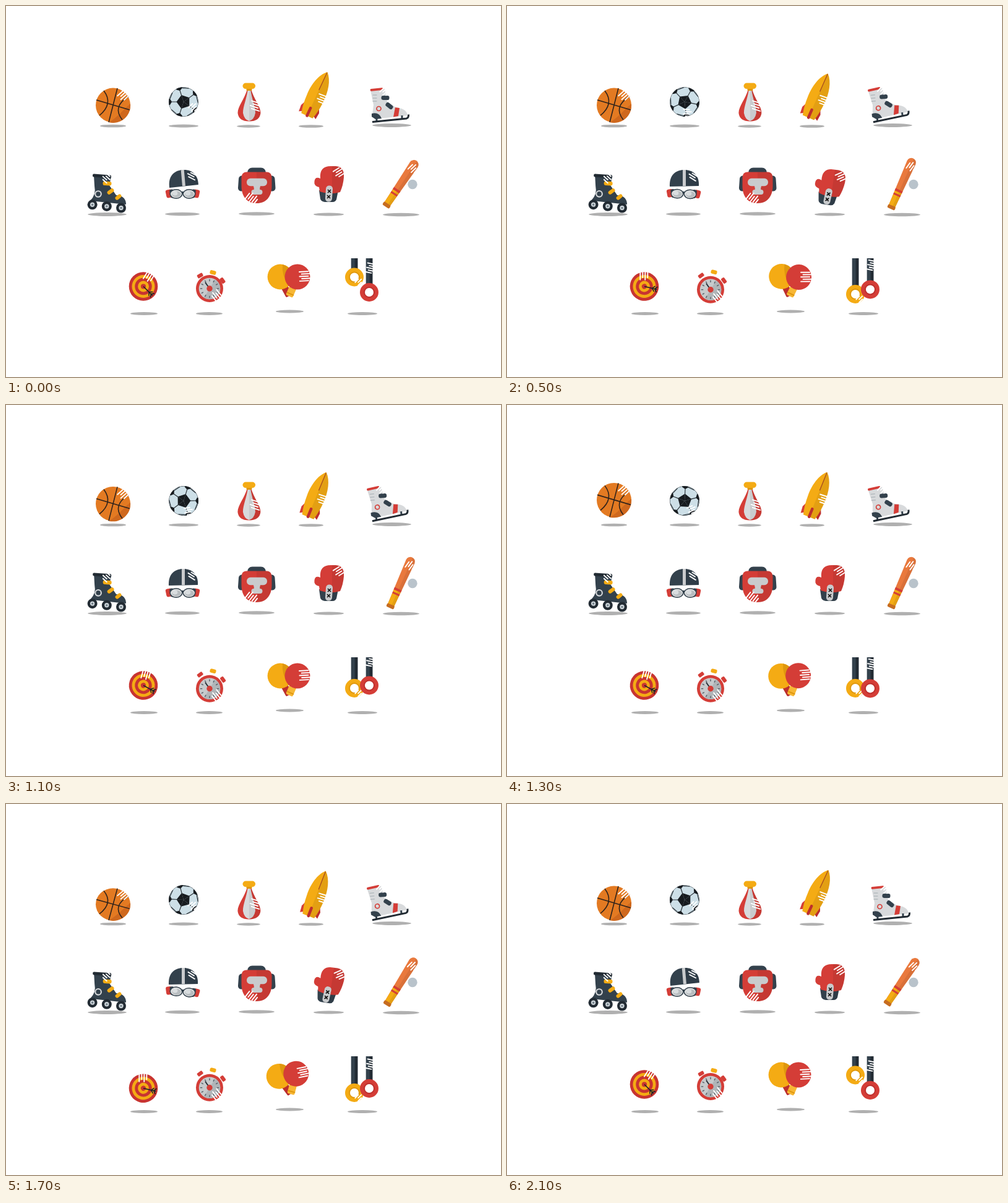
An HTML page with a canvas for the animation above (7100 ms loop, 800 px wide and 600 px high).

```html
<!DOCTYPE html>
<html lang="en">
<head>
<meta charset="utf-8">
<title>Sports icons</title>
<style>
html, body { margin: 0; width: 100%; height: 100%; overflow: hidden; background: #fff; }
canvas { display: block; width: 800px; height: 600px; }
</style>
</head>
<body>
<canvas id="stage" width="800" height="600"></canvas>
<script>
const ctx = document.getElementById('stage').getContext('2d');
const LOOP = 7100, ACTIVE = 2100, STEP = 100;
const RED = '#d43d37', DARK_RED = '#bd2f2d', YELLOW = '#f4ab14', AMBER = '#df970e';
const NAVY = '#33414c', INK = '#222b33', GREY = '#c9cbcd', PALE = '#d8dadc';

// Shapes; a shape with shadeX is darker to the right of it
function fill(color, d, shadeX) {
  const p = new Path2D(d);
  ctx.fillStyle = color;
  ctx.fill(p);
  if (shadeX === undefined) return;
  ctx.save();
  ctx.clip(p);
  ctx.fillStyle = 'rgba(0,0,0,.07)';
  ctx.fillRect(shadeX, -100, 800, 800);
  ctx.restore();
}
function line(color, width, d) {
  ctx.strokeStyle = color;
  ctx.lineWidth = width;
  ctx.stroke(new Path2D(d));
}
function oval(color, x, y, rx, ry = rx) {
  ctx.fillStyle = color;
  ctx.beginPath();
  ctx.ellipse(x, y, rx, ry, 0, 0, 7);
  ctx.fill();
}
function ring(color, x, y, r, width) {
  ctx.strokeStyle = color;
  ctx.lineWidth = width;
  ctx.beginPath();
  ctx.arc(x, y, r, 0, 7);
  ctx.stroke();
}
function bar(color, x, y, w, h, r = 0, deg = 0) {
  turn(x, y, deg, () => {
    ctx.fillStyle = color;
    ctx.beginPath();
    ctx.roundRect(-w / 2, -h / 2, w, h, r);
    ctx.fill();
  });
}
function shine(x, y, deg, n = 4, len = 13, gap = 4) {
  turn(x, y, deg, () => {
    for (let i = 0; i < n; i++) {
      bar('#fff', i % 2 ? 2 : -1.5, (i - (n - 1) / 2) * gap, len, 1.9, .9);
    }
  });
}
const shadow = (x, y, r) => oval('#b0b0b0', x, y, r, 1.2 + r * .055);

// Transforms
function turn(x, y, deg, draw, sy = 1) {
  ctx.save();
  ctx.translate(x, y);
  ctx.rotate(deg * Math.PI / 180);
  ctx.scale(1, sy);
  draw();
  ctx.restore();
}
const move = (dx, dy, draw) => turn(dx, dy, 0, draw);
// Rotate about a stage point while keeping stage coordinates
const pivot = (x, y, deg, draw, sy) => turn(x, y, deg, () => move(-x, -y, draw), sy);

// Motion
const sine = (t, period) => Math.sin(2 * Math.PI * t / period);
const wave = (t, period = 600) => (1 - Math.cos(2 * Math.PI * t / period)) / 2;
const beat = t => wave(t) ** 3;
const bounce = t => sine(t, 1000) ** 5;
const up = v => Math.max(0, v);
const bump = (t, mid, half) =>
  Math.abs(t - mid) < half ? Math.cos(Math.PI / 2 * (t - mid) / half) ** 2 : 0;

function basketball(t) {
  shadow(173, 194, 21);
  pivot(173, 188.5, 0, () => move(0, -8.5 * up(bounce(t)), () => {
    oval('#e37a22', 173, 160.5, 28);
    fill('#cf681d', 'M166 188C177 183 190 167 201 158A28 28 0 0 1 166 188Z');
    line('#30231b', 1.6, 'M146 152L200 168M180 133L166 188M158 137Q174 158 151 177M198 146Q171 163 188 184');
    shine(189.5, 145, -42);
  }), 1 - .085 * up(-bounce(t)));
}

function football(t) {
  shadow(287, 194, 24);
  const roll = 54 * Math.sin(Math.PI * (t / ACTIVE) ** .63) ** 3;
  turn(287, 155, roll, () => {
    ctx.beginPath();
    ctx.arc(0, 0, 24, 0, 7);
    ctx.clip();
    oval('#cddfe7', 0, 0, 24);
    for (let a = -36; a < 324; a += 72) turn(0, 0, a, () => {
      fill('#171b1f', 'M0 0L11.5 0L3.5 11ZM19 0L22 5L27 6V-6L22 -5Z');
      line('#2b3339', 1.2, 'M10 0H20M22 5L18 15');
    });
    ring('#2b3339', 0, 0, 23.8, .7);
    shine(16, 9, -45, 4, 11, 3.6);
  });
}

function punchBag(t) {
  shadow(392, 194.5, 19);
  pivot(393, 130, beat(t) * 8, () => {
    fill(RED, 'M390 134C386 150 374.5 162 374.5 173Q376 186.500 393 186.500T411.5 173C411.5 162 400 150 396 134Z', 393);
    fill(PALE, 'M391 134C389 150 383 162 383 173Q385 184 393 186Q401 184 403 173C403 162 397 150 395 134Z', 393);
    shine(403, 161.5, 18, 4, 15);
  });
  bar(AMBER, 393, 134.5, 9, 5, 1.5);
  bar(YELLOW, 392.8, 129.3, 20.5, 9.6, 4.8);
}

function surfboard(t) {
  shadow(493, 194.5, 20);
  const lean = 25 - 14 * wave(t) * t / 1500;
  turn(502, 144 + 4 * wave(t) ** .3, lean, () => {
    fill(RED, 'M-12 16L-16 25L-15 36L-8 32Z');
    fill(DARK_RED, 'M12 16L16 25L15 36L8 32Z');
    fill(YELLOW, 'M0 -41C11 -31 15 -12 14.5 5Q14 24 10 37H-10Q-14 24 -14.500 5C-15 -12 -11 -31 0 -41Z', 0);
    bar(DARK_RED, 0, 30, 4.5, 18, 2);
    line('#a64b20', 1.3, 'M0 -40V-9');
    shine(10.5, 2, -4);
  });
}

function iceSkate(t) {
  shadow(623.5, 193, 31.5);
  pivot(594, 188, -14 * wave(t) ** .6, () => {
    fill(PALE, 'M589 136L612 134L616 155L630 164Q648 166 649 177L604 182L592 176L594 160Z');
    bar(RED, 599, 135, 21, 3.8, 1.9, -6);
    for (let y = 144; y < 156; y += 5) bar('#aeb5ba', 596, y, 7, 1.3);
    fill(NAVY, 'M591 174Q603 171 607 182L597 183L591 179Z');
    line(NAVY, 3, 'M599 181V187M640 177V183');
    fill(RED, 'M629 164L636 165L634 178L626 179.500Z');
    bar(NAVY, 613, 148.5, 13, 7, 3, 2);
    bar(NAVY, 619.5, 161.5, 13, 7, 3, 38);
    ring(RED, 602.5, 166, 3.5, 1.7);
    line(INK, 3, 'M592 187.500L647 182Q651 181 650.500 175.500');
    shine(612, 139, -42, 4, 10, 3.6);
  });
}

function rollerSkate(t) {
  shadow(163.5, 337, 31.5);
  pivot(186, 326, 13 * beat(t), () => {
    fill(NAVY, 'M142 274L170 276L167 290L178 306Q194 307 194 321L136 315Q146 305 143 291Z');
    bar(INK, 155, 275, 30, 5, 2, 4);
    bar(YELLOW, 163.5, 287, 14, 6.5, 3, 3);
    bar(YELLOW, 169, 300, 12, 6, 3, -36);
    bar(YELLOW, 181.5, 309, 11, 6, 3, -38);
    ring(PALE, 149, 304, 4.8, 2.1);
    for (let i = 0; i < 3; i++) move(139.6 + 23.2 * i, 321.3 + 2.6 * i, () => {
      oval(INK, 0, 0, 8);
      oval('#cbd3d8', 0, 0, 3.7);
      oval('#6b7982', 0, 0, 1.6);
    });
    shine(162, 278, 42, 4, 10, 3.8);
  });
}

function swimSet(t) {
  shadow(285, 336.5, 28);
  pivot(286.5, 280, Math.min(0, t / 40 - 5), () => {
    fill(NAVY, 'M263 292C262 274 272 265 286.500 265S311 274 310 291Z', 288);
    bar(GREY, 286.5, 278, 5, 26);
    shine(301.5, 274, 32, 4, 13, 3.8);
  });
  pivot(285.5, 304, 5 * up(sine(t, 1400)) ** 4, () => {
    for (const side of [-1, 1]) {
      bar(RED, 285.5 + side * 22, 303.5, 10, 13, 3, side * 12);
      bar(NAVY, 285.5 + side * 17, 303.5, 7, 14, 3, side * 12);
    }
    bar(NAVY, 285.5, 302, 8, 4);
    for (const x of [275, 296]) {
      oval(NAVY, x, 304, 10.6, 7.9);
      oval('#dfe1e2', x, 304, 9, 6.4);
      oval('#b8bdc0', x + .5, 304.5, 7.3, 5);
      oval('#d9dddf', x - 2, 303, 4.3, 3.4);
    }
  });
}

function headGuard(t) {
  shadow(405, 336, 29);
  pivot(405, 292, beat(t) * 4.5, () => {
    bar(NAVY, 381, 287, 11, 25, 5, 4);
    bar(NAVY, 429.5, 287, 11, 25, 5, -4);
    bar(NAVY, 405, 270, 30, 17, 8);
    fill(RED, 'M388 268.500H422Q429 269 429.500 277V292C429 309 420 319 405 319S381 309 380.500 292V277Q381 269 388 268.500Z', 405);
    bar(GREY, 405.5, 285, 33, 12.5, 6);
    fill(GREY, 'M399 289H412Q409 295 411 300H400Q402 295 399 289Z');
    bar(GREY, 405.5, 301, 18, 8, 4);
    shine(397, 311.5, -52, 5, 14, 4);
  });
}

function glove(t) {
  shadow(521.5, 337, 24.5);
  const k = up(sine(t - 100, 1200)) ** .5;
  move(-k * 1.5, k * 5, () => pivot(522, 290, k * 9, () => {
    fill(NAVY, 'M506 298H537L534 313Q532 317 528 317H515Q509 316 508 312Z', 524);
    fill(RED, 'M508 279Q506 259 525 259H533Q547 260 546 277Q545 290 540 301Q523 306 507 300L506 293Q497 291 498.500 283Q500 275 508 279Z', 527);
    bar(GREY, 522, 303.5, 11, 26, 5, 4);
    for (const y of [-1, 1]) move(522 - y / 2, 304 + y * 4.5, () =>
      line('#111', 1.7, 'M-2.500 -2.500L2.500 2.500M2.500 -2.500L-2.500 2.500'));
    shine(538, 269, -32);
  }));
}

function bat(t) {
  shadow(638.5, 337.5, 29.5);
  const lift = Math.min(1, t / 300, up(1750 - t) / 250);
  turn(638, 288, 34 - 10 * lift, () => {
    fill('#e9793d', 'M-7.500 -38A7.500 7.500 0 0 1 7.500 -38L5.500 40H-5.500Z', 1);
    fill(YELLOW, 'M-6 10H6L5.500 40H-5.500Z', 1);
    bar(RED, 0, 12, 12.5, 4);
    bar(RED, 0, 19, 12, 3);
    bar('#c66c20', 0, 41, 13, 6, 2);
    shine(3, -32, -78, 4, 12, 3.8);
  });
  oval('#b9c3cb', 657, 288.5, 7.7);
}

function target(t) {
  shadow(223, 497.5, 22);
  turn(222, 453.5 + 8 * up(-bounce(t)), -32 * wave(t, 1200) ** .25, () => {
    for (let i = 0; i < 5; i++) oval(i % 2 ? YELLOW : '#c83431', 0, 0, 23.3 - 4.8 * i);
    turn(0, 0, 45, () =>
      line('#1d2328', 1.6, 'M0 0H21M17 -4.500L13 0L17 4.500M21 -4.500L17 0L21 4.500'));
    shine(9, -16, -58, 4, 14);
  });
}

function stopwatch(t) {
  shadow(328.5, 497.5, 21.5);
  const y = 7 * wave(t);
  bar(YELLOW, 334.5, 431 - y * .4, 10, 6.5, 2.5, 14);
  bar(RED, 313.7, 436, 9.5, 6, 1.5, -30 - y * 4);
  bar(RED, 350 + y * .35, 444, 9.5, 6, 1.5, 54);
  move(329, 457 + y, () => {
    oval(RED, 0, 0, 22);
    oval('#c7cacc', 0, 0, 17.3);
    fill('#b0b5b8', 'M9 -14.800A17.300 17.300 0 0 1 -9 14.800Z');
    for (let a = 0; a < 360; a += 30) turn(0, 0, a, () => bar('#56616a', 0, -13.5, 1.4, 3.5));
    line(INK, 1.8, 'M0 0L-7 -10');
    oval(RED, 0, 0, 4.7);
    shine(11, 11, 52);
  });
}

function paddles(t) {
  shadow(458.5, 494, 22.5);
  pivot(457.5, 452, 10 * (bump(t, 300, 300) - bump(t, 1600, 400)), () => {
    bar(DARK_RED, 453.5, 461, 11, 18, 2, -28);
    oval(YELLOW, 443, 438, 20.4);
    fill(AMBER, 'M447 418A20.400 20.400 0 0 1 457 453Q445 435 447 418Z');
    bar('#f7b735', 461, 461.5, 12, 17, 2, 24);
    bar(AMBER, 459.5, 465.5, 12, 2, 0, 24);
    oval(RED, 471, 438, 20.5);
    shine(483, 437, -3, 5, 16, 3.7);
  });
}

function medal(x, y, color, rim) {
  const length = y - 418;
  bar(NAVY, x, 408 + length / 2, 10.6, length);
  bar(INK, x + 3, 408 + length / 2, 4.6, length);
  oval(color, x, y, 15);
  ring(rim, x, y, 8, 2);
  oval('#fff', x, y, 7);
}

function medals(t) {
  shadow(576, 497.5, 24);
  const a = 458 - 19.5 * bump(t, 0, 300) + 16 * bump(t, 700, 400) + 9 * bump(t, 1700, 200);
  const b = 460 + 3 * bump(t, 0, 300) - 6.5 * (bump(t, 300, 300) + bump(t, 1100, 300));
  medal(563, a, YELLOW, AMBER);
  shine(571.5, a + 8.5, -45, 4, 9, 3.4);
  medal(587, b, RED, DARK_RED);
  shine(589, b - 39, 12, 5, 11, 3.7);
}

const ICONS = [
  basketball, football, punchBag, surfboard, iceSkate,
  rollerSkate, swimSet, headGuard, glove, bat,
  target, stopwatch, paddles, medals
];

function draw(now) {
  const step = Math.floor(now % LOOP / STEP) * STEP;
  const t = step < ACTIVE ? step : 0;
  ctx.fillStyle = '#fff';
  ctx.fillRect(0, 0, 800, 600);
  for (const icon of ICONS) icon(t);
}

const start = performance.now();
function tick() {
  draw(performance.now() - start);
  requestAnimationFrame(tick);
}
tick();
</script>
</body>
</html>
```
